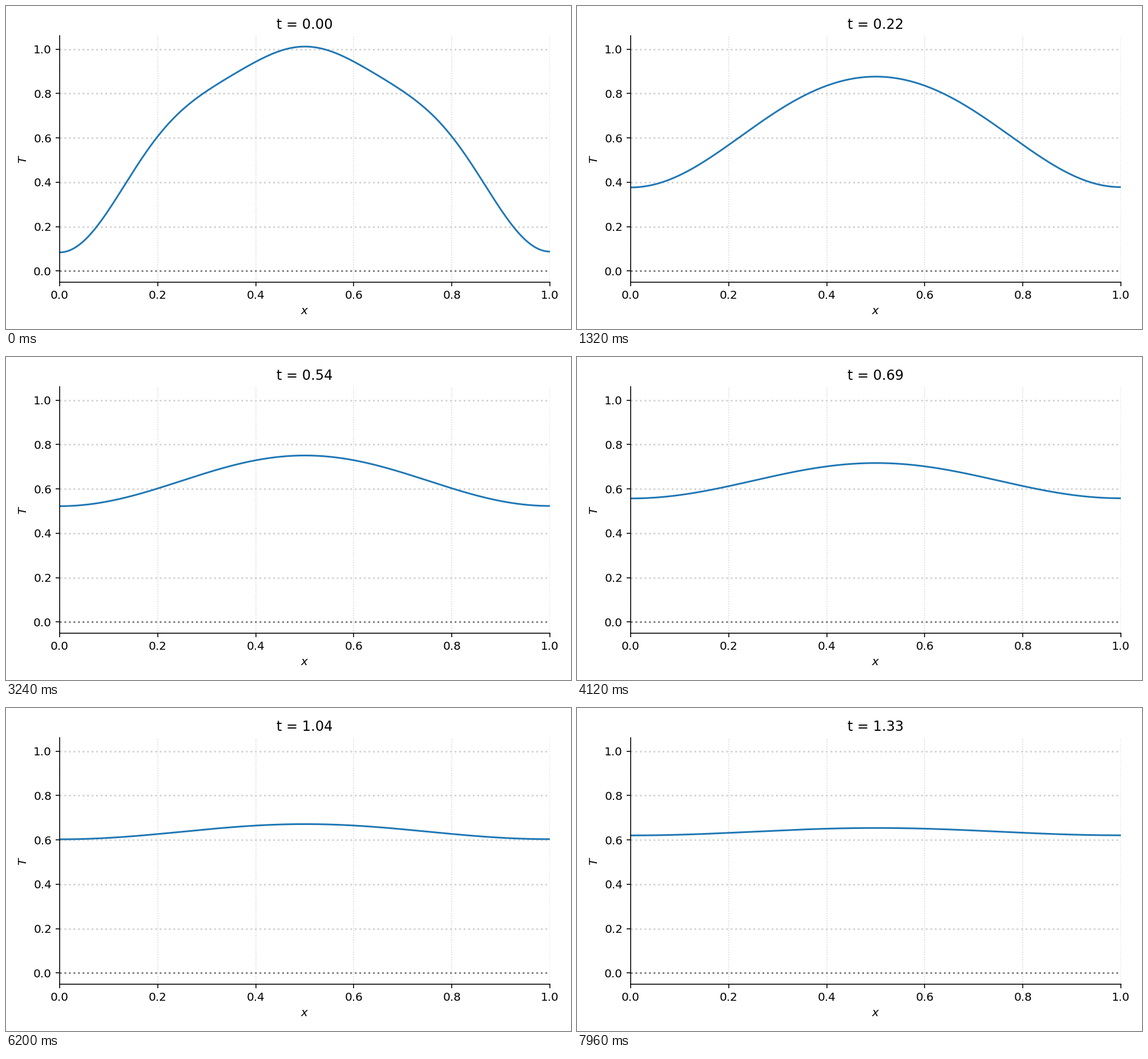
Recreate the animation shown at these times as a matplotlib script. Size 990 by 566 pixels, loop 8 s.

```python
import numpy as np
import matplotlib.pyplot as plt
from matplotlib.animation import FuncAnimation

W, H, DPI = 990, 566, 144
FRAMES, INTERVAL = 200, 40
DT = 4 / 599            # model time per frame
RATE = 2.44 / 4         # decay of the first cosine mode

# Axes box and the pixel rows of T = 0 and one unit of T
LEFT, RIGHT, TOP, BOTTOM = 94, 953, 52, 484
ZERO, UNIT = 464.3, 388.7

# Cosine coefficients of the temperature profile
COEF = np.array([0.637, -0.0006, -0.4265, -0.0006, -0.0884, -0.0006, -0.0365])
MODES = np.arange(len(COEF))

x = np.linspace(0, 1, 401)
basis = np.cos(np.pi * np.outer(MODES, x))


def temperature(t):
    return (COEF * np.exp(-RATE * MODES**2 * t)) @ basis


plt.rcParams["font.family"] = "DejaVu Sans"
plt.rcParams["font.size"] = 10

fig = plt.figure(figsize=(W / DPI, H / DPI), dpi=DPI, facecolor="white")
ax = fig.add_axes([LEFT / W, 1 - BOTTOM / H,
                   (RIGHT - LEFT) / W, (BOTTOM - TOP) / H])
ax.set_xlim(0, 1)
ax.set_ylim((ZERO - BOTTOM) / UNIT, (ZERO - TOP) / UNIT)
ax.set_xticks(np.arange(6) / 5)
ax.set_yticks(np.arange(6) / 5)
ax.spines[["top", "right"]].set_visible(False)
ax.set_axisbelow(True)
ax.grid(axis="x", color="lightgray", ls=":", lw=0.8)
ax.grid(axis="y", color="lightgray", ls=":", lw=1.5)
ax.axhline(0, color="gray", ls=":", lw=1.5)
ax.set_xlabel("$x$")
ax.set_ylabel("$T$")
title = ax.set_title("t = 0.00", fontsize=12)
curve, = ax.plot(x, temperature(0), color="#1f77b4", lw=1.5)


def update(i):
    t = i * DT
    curve.set_ydata(temperature(t))
    title.set_text(f"t = {t:.2f}")
    return curve, title


anim = FuncAnimation(fig, update, frames=FRAMES, interval=INTERVAL,
                     repeat=True, repeat_delay=0, blit=False)
plt.show()
```
